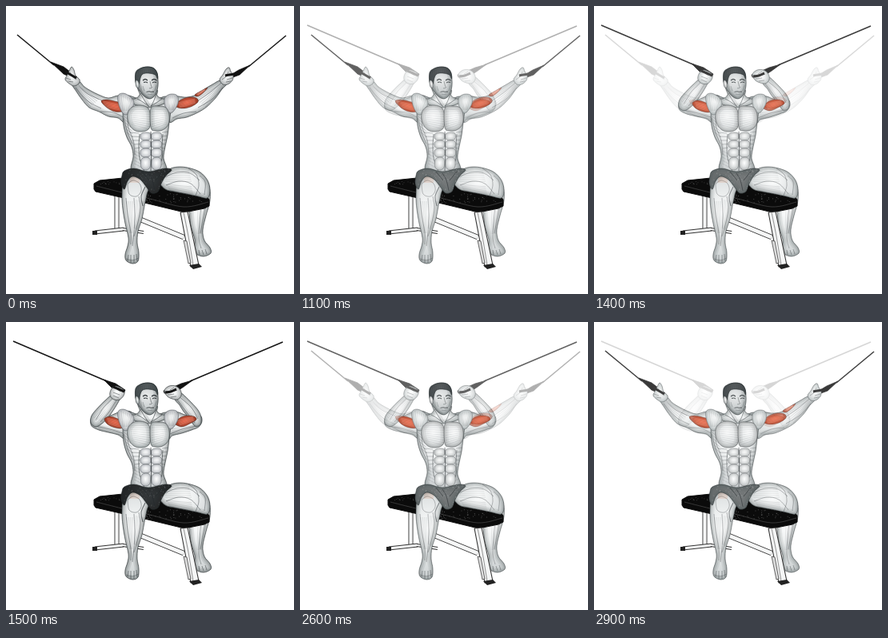
An HTML page with a canvas for the animation above (3000 ms loop, 360 by 360 pixels).

```html
<!DOCTYPE html>
<html lang="en">
<head>
<meta charset="utf-8">
<title>Seated overhead cable curl</title>
<style>
html, body { margin: 0; width: 100%; height: 100%; overflow: hidden; background: #fff; }
canvas { display: block; width: 360px; height: 360px; }
</style>
</head>
<body>
<canvas id="stage" width="360" height="360"></canvas>
<script>
const SIZE = 360, LOOP = 3000, STEP = 100;
const stage = document.getElementById('stage').getContext('2d');
let ctx, soft;

const points = s => s.trim().split(/\s+/).map(p => p.split(',').map(Number));

// Smooth curve through the given points
function curve(s, closed) {
  const p = points(s), n = p.length, path = new Path2D();
  const at = i => closed ? p[(i + n) % n] : p[Math.max(0, Math.min(n - 1, i))];
  path.moveTo(...p[0]);
  for (let i = 0; i < (closed ? n : n - 1); i++) {
    const [a, b, c, d] = [at(i - 1), at(i), at(i + 1), at(i + 2)];
    path.bezierCurveTo(b[0] + (c[0] - a[0]) / 6, b[1] + (c[1] - a[1]) / 6,
      c[0] - (d[0] - b[0]) / 6, c[1] - (d[1] - b[1]) / 6, c[0], c[1]);
  }
  if (closed) path.closePath();
  return path;
}

function poly(s, fill, stroke, width = 1) {
  const path = new Path2D('M' + s.trim().split(/\s+/).join('L') + 'Z');
  if (fill) { ctx.fillStyle = fill; ctx.fill(path); }
  if (stroke) { ctx.strokeStyle = stroke; ctx.lineWidth = width; ctx.stroke(path); }
}

const ink = a => `rgba(36,42,45,${a * (soft ? 0.78 : 1)})`;

// Rounded body part: bright centre, dark rim
function part(s, { light = '#fcfdfd', tone = '#ccd1d2', rim = 1, edge = 0.75, draw } = {}) {
  const path = curve(s, true), p = points(s);
  const xs = p.map(q => q[0]), ys = p.map(q => q[1]);
  const x0 = Math.min(...xs), x1 = Math.max(...xs), y0 = Math.min(...ys), y1 = Math.max(...ys);
  const cx = x0 + (x1 - x0) * 0.5, cy = y0 + (y1 - y0) * 0.42;
  const g = ctx.createRadialGradient(cx, cy, 1, cx, cy, Math.hypot(x1 - x0, y1 - y0) * 0.55);
  g.addColorStop(0, light);
  g.addColorStop(1, tone);
  ctx.save();
  ctx.fillStyle = g;
  ctx.fill(path);
  ctx.clip(path);
  for (const w of [2, 4, 7, 11]) {
    ctx.lineWidth = w;
    ctx.strokeStyle = ink(0.1 * rim);
    ctx.stroke(path);
  }
  if (draw) draw();
  ctx.restore();
  ctx.lineWidth = 0.8;
  ctx.strokeStyle = ink(edge);
  ctx.stroke(path);
}

function lines(s, alpha = 0.5, width = 0.8) {
  ctx.strokeStyle = ink(alpha);
  ctx.lineWidth = width;
  for (const one of s.split('|')) ctx.stroke(curve(one));
}

// Fibres from segment a-b to segment c-d
function fan(s, n, alpha = 0.25, color) {
  const [a, b, c, d] = points(s);
  const mix = (u, v, k) => u + (v - u) * k;
  ctx.strokeStyle = color || ink(alpha);
  ctx.lineWidth = 0.6;
  ctx.beginPath();
  for (let i = 0; i < n; i++) {
    const k = i / (n - 1);
    ctx.moveTo(mix(a[0], b[0], k), mix(a[1], b[1], k));
    ctx.lineTo(mix(c[0], d[0], k), mix(c[1], d[1], k));
  }
  ctx.stroke();
}

function speckle(seed, n, x, y, w, h, color) {
  const rnd = () => (seed = (seed * 16807) % 2147483647) / 2147483647;
  ctx.fillStyle = color;
  for (let i = 0; i < n; i++) ctx.fillRect(x + rnd() * w, y + rnd() * h, 0.9, 0.9);
}

function cable(x0, y0, x1, y1, handle) {
  ctx.strokeStyle = '#161616';
  ctx.lineWidth = 1.5;
  ctx.beginPath();
  ctx.moveTo(x0, y0);
  ctx.lineTo(x1, y1);
  ctx.stroke();
  poly(handle, '#111', '#111', 0.8);
}

function muscle(s, fibres) {
  part(s, {
    light: soft ? '#e9694a' : '#e4573a', tone: soft ? '#c75538' : '#b23c22', rim: 0.7, edge: 0.4,
    draw() { fan(fibres, 6, 0, 'rgba(255,205,185,.4)'); }
  });
}

function tube(a, b, width) {
  for (const [color, w] of [['#333', width], ['#f5f6f6', width - 1.8]]) {
    ctx.strokeStyle = color;
    ctx.lineWidth = w;
    ctx.beginPath();
    ctx.moveTo(...a);
    ctx.lineTo(...b);
    ctx.stroke();
  }
}

function bench() {
  tube([138.5, 230], [138.5, 281], 6);
  tube([111, 283], [147, 279], 5);
  tube([146, 279], [172, 283], 4);
  poly('108,281 114,281 114,286 108,286', '#222');
  tube([169, 244], [166, 266], 5);
  tube([166, 266], [222, 289], 6.5);
}

function pad() {
  poly('110,222 117,218 146,215 200,225 250,237 254,242 254,250 248,253 223,258 165,244 112,232 110,229', '#0b0b0b', '#111');
  speckle(17, 55, 172, 234, 72, 12, '#555');
  speckle(5, 14, 118, 219, 25, 5, '#444');
  ctx.strokeStyle = '#4b4b4b';
  ctx.lineWidth = 0.7;
  ctx.stroke(curve('113,225 145,233 180,241 222,251 253,245'));
  poly('218,258 227,257 241,324 231,326', '#f5f6f6', '#333', 1.1);
  ctx.strokeStyle = '#999';
  ctx.stroke(curve('222,258 228,288 234,324'));
  poly('222,293 226,294 231,321 228,322', '#ddd', '#444', 0.8);
  poly('229,324 241,322 245,326 234,329', '#222');
}

function farLeg() {
  part('233,222 228,240 229,255 231,275 236,292 235,303 238,310 247,313 256,309 255,302 248,293 246,280 250,262 255,243 254,226 246,214', {
    draw() {
      lines('244,252 242,270 241,290 244,303|249,252 246,268 243,284', 0.45);
      fan('240,252 250,250 239,285 245,285', 5, 0.2);
      lines('245,305 247,311|249,304 251,310|241,305 242,311', 0.6);
    }
  });
}

function farThigh() {
  part('198,210 206,203 218,201 231,203 243,208 252,218 255,230 252,240 240,238 226,235 210,232 199,229 192,220', {
    draw() {
      lines('198,214 214,208 230,209 242,218|200,224 216,219 231,222 243,235|228,203 238,211 241,224 237,237|242,212 249,220 248,236', 0.5);
      fan('201,207 199,219 229,207 232,219', 6, 0.22);
      fan('200,223 204,230 232,226 234,235', 5, 0.25);
    }
  });
}

function nearLeg() {
  part('148,220 145,236 146,254 149,272 153,290 152,300 149,310 150,318 158,322 165,319 166,308 164,296 165,282 170,266 173,250 176,236 178,224 165,211', {
    draw() {
      lines('152,222 159,218 167,222 169,231 163,238 154,235 152,222', 0.45);
      lines('160,240 161,262 160,282 158,300|166,238 168,252 165,270 160,288|150,240 152,260 156,284 156,298', 0.5);
      lines('174,226 169,238 171,250', 0.6, 1.2);
      fan('151,244 158,244 155,284 158,284', 4, 0.22);
      fan('163,242 172,244 160,278 164,280', 5, 0.22);
      lines('153,311 152,319|156,311 156,321|160,311 160,321|163,310 164,319', 0.6);
      lines('150,316 158,318 166,315', 0.45);
      ctx.fillStyle = 'rgba(215,125,85,.16)';
      ctx.fillRect(155, 212, 12, 9);
    }
  });
}

function shorts() {
  const base = soft ? '#65696a' : '#1c1f20';
  part('148,206 160,203 178,207 199,203 207,205 200,212 194,222 190,232 182,234 176,227 168,217 158,213 152,219 148,229 144,222 145,212', {
    light: soft ? '#777b7c' : '#34383a', tone: base, rim: 0.6,
    draw() {
      speckle(31, 70, 145, 204, 60, 29, soft ? '#929697' : '#54585a');
      lines('178,209 183,218 186,231|170,207 179,218|196,207 187,218', 0.7, 1);
    }
  });
}

function torso() {
  part('160,114 152,112 146,118 146,134 147,150 151,164 157,176 159,188 157,206 178,211 200,206 197,190 199,176 202,162 204,146 206,130 207,118 200,113 190,116 178,120', {
    tone: '#c3c8ca',
    draw() {
      lines('152,138 153,152 159,168 161,186|147,140 152,158 158,172', 0.5);
      fan('148,138 151,158 155,144 159,164', 6, 0.35);
      fan('155,158 161,178 166,159 168,177', 5, 0.5);
      fan('203,157 198,178 195,158 193,177', 5, 0.5);
      fan('161,181 160,201 168,185 170,206', 6, 0.25);
      fan('197,181 198,201 193,185 192,205', 5, 0.25);
      lines('167,160 166,176 167,190 173,207|196,160 195,176 195,190 189,207', 0.55, 1.1);
    }
  });
  part('166,102 167,111 160,116 149,113 158,122 178,127 198,122 208,114 197,116 189,112 188,104', {
    draw() {
      lines('168,109 173,118 179,126|188,109 185,118 181,126|164,116 171,120 178,125|195,116 188,121 181,125', 0.55, 1);
      fan('169,108 174,112 176,123 180,124', 4, 0.25);
    }
  });
  part('140,112 147,109 156,114 160,122 154,134 147,135 141,124', {
    rim: 0.65, edge: 0.45, draw() { fan('144,111 157,116 146,131 153,131', 6, 0.22); }
  });
  part('199,114 206,110 214,112 215,122 208,133 202,132 198,122', {
    rim: 0.65, edge: 0.45, draw() { fan('201,113 213,112 204,130 209,130', 6, 0.22); }
  });
  part('178,128 168,124 158,126 152,134 153,146 160,155 170,157 179,153 181,140', {
    rim: 0.8, edge: 0.6, draw() { fan('180,129 180,154 155,130 157,148', 9, 0.2); }
  });
  part('181,128 191,125 200,127 204,136 203,148 196,155 187,156 181,152', {
    rim: 0.8, edge: 0.6, draw() { fan('182,129 182,154 202,130 201,147', 9, 0.2); }
  });
  // Abdominals
  for (const [y, h] of [[163, 5], [173, 5], [183.5, 5.5], [197, 8]]) {
    for (const x of [174.5, 188]) {
      const w = y > 190 ? 5.5 : 6;
      part(`${x - w},${y - h * .6} ${x},${y - h} ${x + w},${y - h * .7} ${x + w},${y + h * .6} ${x},${y + h} ${x - w},${y + h * .6}`, { rim: 0.45, edge: 0.42 });
    }
  }
  lines('181,157 181.5,176 181.5,192 181,206', 0.7, 1);
}

function head() {
  part('162,92 163,84 168,78 177,76 185,78 189,84 190,92 190,100 188,108 184,114 179,116 173,113 167,106 163,100', {
    light: '#e8eaea', tone: '#afb5b7',
    draw() {
      ctx.fillStyle = ink(0.18);
      ctx.fill(curve('164,90 169,98 171,108 179,115 171,115 163,104', true));
      lines('171,93 174,91.5 177,93|182,93 185,91.5 188.5,93', 0.85, 1.4);
      lines('172,95.5 175,95 177,96|183,96 185,95 188,95.5', 0.85, 1.2);
      lines('180,94 181.5,100 182.5,102 179,103', 0.55);
      lines('175.5,107.5 179,106.8 181,107.3 185,107', 0.75, 1.1);
      lines('177,110 180,110.5 183,110|171,100 173,106|188,99 186,106', 0.35);
    }
  });
  part('162,95 162,83 168,78 177,76 185,78 189,84 189.5,91 186.5,86 178,84 171,85 168,90 166,98', {
    light: '#656b6d', tone: '#3d4345', rim: 0.5,
    draw() { fan('165,80 187,79 166,89 188,87', 14, 0.3); }
  });
  part('162,94 164,93 166,96 166,102 163,101', { edge: 0.6, rim: 0.5 });
}

function openArms() {
  cable(14, 36, 60, 74, '56,70 72,76 89,89 88,92 72,85');
  cable(350, 37, 303, 76, '305,74 291,80 281,86 281,90 292,86');
  part('91,94 98,101 106,106 116,111 128,115 140,112 152,114 158,128 150,146 140,140 128,138 116,132 104,127 95,117 88,107 83,98', {
    draw() {
      fan('88,99 85,102 116,117 106,126', 6, 0.3);
      lines('88,96 101,109 120,118|87,102 101,118 119,128|118,132 134,133 148,140', 0.5);
    }
  });
  part('268,93 258,98 248,104 238,111 226,114 216,113 206,112 199,126 204,145 214,141 226,139 240,133 251,126 262,115 270,104 276,97', {
    draw() {
      fan('269,97 274,100 238,117 249,126', 6, 0.3);
      lines('269,96 256,107 240,118|271,102 258,116 240,127|238,132 222,134 208,140', 0.5);
    }
  });
  muscle('119,119 126,117 136,119 146,122 153,129 146,132 136,132 126,127', '121,119 123,126 149,125 147,131');
  muscle('212,125 217,118 228,114 238,115 240,120 231,126 220,128', '215,121 217,127 236,116 237,121');
  muscle('236,111 244,106 252,102 247,108 240,113', '238,110 240,112 248,104 249,105');
  part('76,87 79,81 82,76 85,80 87,87 92,92 91,97 85,100 79,97 74,92', {
    rim: 0.6, draw() { lines('75,90 81,92|78,94 84,95|80,83 84,89 88,92', 0.6); }
  });
  part('267,92 271,86 275,79 279,77 281,82 284,86 283,93 277,98 271,98', {
    rim: 0.6, draw() { lines('283,90 276,92|281,94 275,95|278,82 275,88 270,92', 0.6); }
  });
  ctx.strokeStyle = '#151515';
  ctx.lineWidth = 3;
  ctx.stroke(curve('74,82 81,86 88,90'));
  ctx.stroke(curve('274,87 279,86 285,85'));
}

function bentArms() {
  cable(9, 24, 126, 74, '122,72 137,77 149,85 147,89 134,84');
  cable(346, 25, 230, 74, '233,73 219,77 203,84 197,86 198,89 210,89 222,81');
  part('158,114 148,111 140,113 130,117 120,117 110,115 106,122 107,130 116,135 128,138 140,141 150,146 158,130', {
    draw() { lines('112,130 130,134 149,140', 0.5); fan('114,129 116,134 146,134 148,142', 4, 0.25); }
  });
  part('199,114 208,112 216,113 224,116 234,116 243,117 245,124 241,131 232,135 220,139 208,142 203,146 199,128', {
    draw() { lines('238,130 220,134 205,140', 0.5); fan('236,129 234,134 207,134 206,141', 4, 0.25); }
  });
  part('133,91 124,98 115,107 107,117 106,126 112,131 120,127 128,119 135,109 141,99 143,93', {
    draw() { lines('135,94 122,107 112,123|139,96 129,112 118,125', 0.5); fan('134,93 141,96 110,120 120,125', 6, 0.25); }
  });
  part('211,96 217,104 222,112 229,120 236,130 243,128 244,119 240,110 232,101 224,93 218,89', {
    draw() { lines('217,94 231,106 240,121|214,97 225,112 236,126', 0.5); fan('213,97 219,92 231,122 241,119', 6, 0.25); }
  });
  muscle('123,121 130,118 140,121 149,125 151,129 143,133 133,131 126,127', '126,120 128,127 147,125 145,132');
  muscle('211,127 217,120 226,117 235,118 238,122 230,127 220,131', '214,123 217,129 234,118 235,123');
  part('131,85 136,80 143,82 148,86 147,92 142,97 135,97 130,92', {
    rim: 0.6, draw() { lines('134,88 142,91|134,92 141,95|137,82 143,87', 0.6); }
  });
  part('198,85 204,80 212,80 218,85 219,92 214,97 205,95 200,91', {
    rim: 0.6, draw() { lines('202,91 210,90|206,94 213,93|210,82 205,85', 0.6); }
  });
  ctx.strokeStyle = '#151515';
  ctx.lineWidth = 3.2;
  ctx.stroke(curve('134,81 141,84 148,87'));
  ctx.stroke(curve('199,88 206,87 213,84'));
}

function render(arms, isSoft) {
  const layer = document.createElement('canvas');
  layer.width = layer.height = SIZE;
  ctx = layer.getContext('2d');
  soft = isSoft;
  ctx.lineJoin = 'round';
  ctx.fillStyle = '#fff';
  ctx.fillRect(0, 0, SIZE, SIZE);
  farLeg();
  bench();
  pad();
  arms();
  torso();
  head();
  farThigh();
  nearLeg();
  shorts();
  return layer;
}

const poses = [false, true].map(s => [render(openArms, s), render(bentArms, s)]);

// Share of the bent pose; blends in six even steps
function blend(t) {
  const step = from => (Math.floor((t - from) / STEP) + 1) / 6;
  if (t < 1000) return 0;
  if (t < 1500) return step(1000);
  if (t < 2500) return 1;
  return 1 - step(2500);
}

function frame() {
  const k = blend(performance.now() % LOOP);
  const [open, bent] = poses[k > 0 && k < 1 ? 1 : 0];
  stage.globalAlpha = 1;
  stage.drawImage(open, 0, 0);
  stage.globalAlpha = k;
  stage.drawImage(bent, 0, 0);
  requestAnimationFrame(frame);
}
frame();
</script>
</body>
</html>
```
